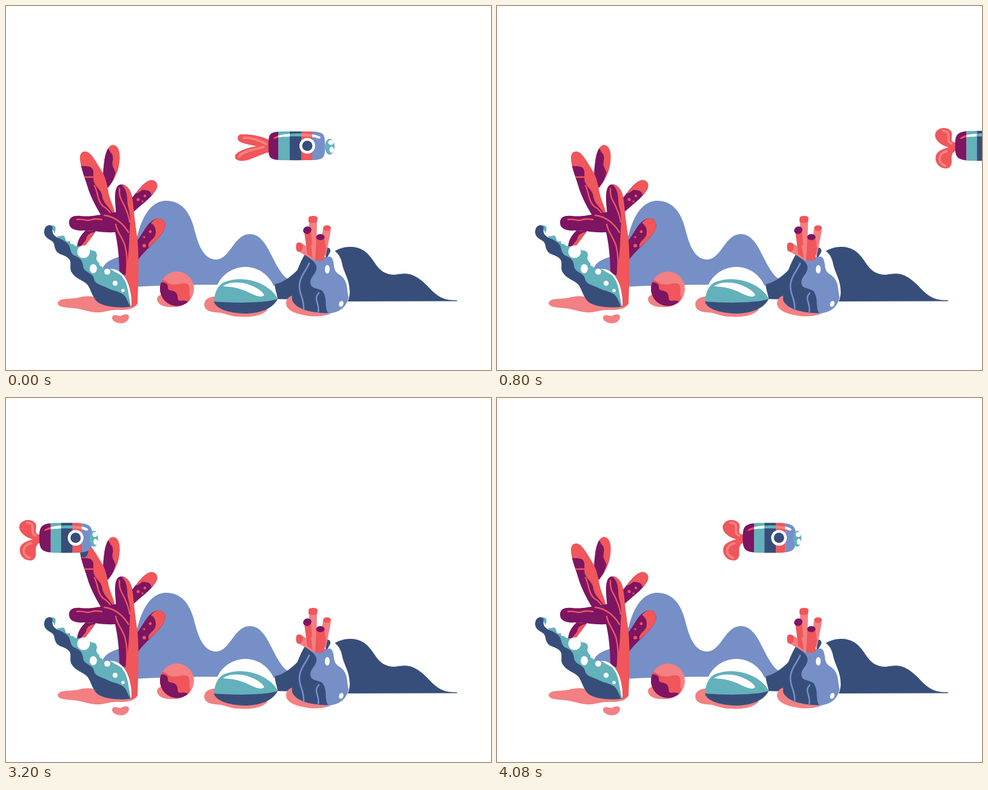
These frames come from a looping animation (800 px wide and 600 px high, 4160 ms). An HTML page:

```html
<!DOCTYPE html>
<html lang="en">
<head>
<meta charset="utf-8">
<title>Reef</title>
<style>
html, body { margin: 0; width: 100%; height: 100%; overflow: hidden; background: #fff; }
svg { display: block; width: 100%; height: 100%; }
.p { fill: #7d1562; } .r { fill: #f0565a; } .k { fill: #f38082; } .n { fill: #374e7b; }
.b { fill: #768fc7; } .t { fill: #62b1bb; } .w { fill: #fff; }
.l { fill: none; stroke: #f0565a; stroke-width: 2.4; stroke-linecap: round; }
.v { fill: none; stroke: #768fc7; stroke-width: 2.6; stroke-linecap: round; }
.f { fill: none; stroke: #f38082; stroke-width: 4; stroke-linecap: round; }
</style>
</head>
<body>
<svg viewBox="0 0 800 600">
<defs>
  <path id="armA" d="M122 250C122 242 127 239 133 240C142 243 149 258 158 272C166 285 167 300 171 315C175 328 180 336 181 350L160 350C150 334 139 314 134 296C130 282 122 264 122 250Z"/>
  <path id="armB" d="M160 280C161 258 164 229 177 229C187 230 189 245 187 258C185 276 177 288 168 300Z"/>
  <clipPath id="arms"><use href="#armA"/><use href="#armB"/></clipPath>
  <clipPath id="armAIn"><use href="#armA"/></clipPath>
  <clipPath id="armBIn"><use href="#armB"/></clipPath>
  <clipPath id="ball"><ellipse cx="282" cy="466" rx="28" ry="28.5"/></clipPath>
  <clipPath id="bodyIn"><path id="bodyClip"/></clipPath>
  <clipPath id="glossIn"><path id="glossClip"/></clipPath>
</defs>

<!-- hills -->
<path class="b" d="M158 437C160 424 174 416 190 413L217 378C224 350 238 321 264 321C291 321 303 342 309 362C315 384 322 418 347 418C370 417 376 376 402 376C432 376 438 426 462 448L466 450L446 461C410 460 330 459 300 460C270 461 240 461 215 463L190 450Z"/>
<path class="n" d="M443 459C458 455 468 448 482 434L490 484L447 483Z"/>
<path class="n" d="M538 407C550 398 560 397 570 397C592 398 601 413 608 423C616 436 626 443 641 443C660 440 668 440 682 450C704 466 708 486 744 485V486.500L560 487Z"/>

<!-- ground shadows -->
<path class="k" d="M85 490C88 480 104 484 118 481C130 478 140 477 148 481L180 494L213 496C202 502 190 501 180 501C165 502 160 506 147 505C132 503 124 499 110 498C97 497 86 496 85 490Z"/>
<path class="k" d="M175 514C176 506 184 511 189 511C194 508 203 506 203 513C201 521 195 523 188 523C181 522 175 519 175 514Z"/>
<path class="k" d="M249 482C251 476 256 476 260 475L295 491C288 496 280 497 268 496C256 495 249 490 249 482Z"/>
<path class="k" d="M327 492C327 483 338 478 348 479L432 500C426 509 405 514 385 512C368 512 360 505 346 505C334 504 327 500 327 492Z"/>
<path class="k" d="M462 490C462 482 468 478 476 476L540 504C530 512 508 513 494 510C476 507 462 501 462 490Z"/>

<!-- coral -->
<use href="#armB" class="r"/>
<path class="p" clip-path="url(#armBIn)" d="M155 235L169 235C173 245 178 242 176 256C173 268 184 270 179 280L172 302H155Z"/>
<use href="#armA" class="r"/>
<g clip-path="url(#armAIn)">
  <path class="p" d="M118 262C128 266 139 261 143 269C146 276 142 284 146 292C151 302 158 304 159 315C162 329 173 331 181 352H140Z"/>
  <path class="l" d="M130 282H146M146 296C152 308 151 322 160 330C168 334 173 340 177 350"/>
</g>
<path class="p" d="M117 398C118 385 124 377 131 370L148 371C141 382 134 390 129 397Z"/>
<path class="r" d="M146 372C141 383 134 390 129 397L123 398C126 390 132 389 133 381C136 375 140 375 146 372Z"/>
<path class="p" d="M104 357C104 347 113 345 123 346C142 348 150 344 164 343L190 338L212 400V450L187 440C187 415 184 390 180 373C160 374 144 370 129 370C113 371 104 367 104 357Z"/>
<path class="l" d="M117 352C130 350 132 356 142 352C148 350 152 351 158 352"/>
<path class="p" d="M207 317C220 302 228 288 241 287C250 288 252 298 246 305C238 318 222 328 209 341Z"/>
<path class="r" d="M214 309C222 300 230 287 241 287C250 288 252 298 246 305L240 312C239 303 231 304 227 303C222 303 220 309 214 309Z"/>
<path class="p" d="M215 388C228 374 234 351 252 350C263 351 265 361 260 371C250 388 231 400 218 418Z"/>
<path class="r" d="M239 358C244 352 248 350 253 350C263 351 265 361 260 371C253 382 245 390 235 398C233 388 243 386 246 378C249 370 245 360 239 358Z"/>
<g class="r">
  <circle cx="218" cy="319" r="2.600"/><circle cx="229" cy="313" r="2.200"/><circle cx="225" cy="322" r="1.500"/>
  <circle cx="238" cy="372" r="2.400"/><circle cx="228" cy="395" r="3"/><circle cx="228" cy="381" r="1.800"/>
</g>
<path class="p" d="M180 322C179 304 182 293 192 294C201 296 207 305 209 320L214 390L205 460L186 400Z"/>
<path class="r" d="M190 294C202 295 207 307 209 320C211 342 214 364 217 386C220 420 218 460 217 490C215 495 210 497 205 496L196 450L200 425C204 395 203 375 205 355C205 338 200 331 200 320C200 307 196 299 190 294Z"/>
<path class="l" d="M187 301C186 318 193 322 197 333C201 342 203 348 204 356M162 345C180 347 192 357 202 373M181 360C183 374 194 383 197 398C200 410 200 425 199 438"/>

<!-- spiral shell -->
<path class="w" d="M170 434C190 430 208 455 207 494L190 490Z"/>
<path class="t" d="M72 362C79 360 84 364 81 371C80 377 84 381 91 379C97 376 97 382 99 387C103 390 106 385 110 391C113 397 118 396 122 396C130 396 137 400 141 403C148 402 152 409 149 415C149 422 156 424 159 431C165 434 170 433 175 435C181 440 189 441 193 448C202 460 201 475 206 494L180 490L120 430Z"/>
<path class="n" d="M63 371C64 362 71 359 76 363C78 366 75 370 78 376C83 383 92 383 100 390C108 396 104 406 112 411C121 414 126 419 127 428C128 440 142 438 145 449C147 460 160 460 172 467C183 471 193 472 198 481L205 496C185 498 163 496 151 488C142 480 140 466 134 459C127 452 114 449 109 440C103 432 110 422 103 416C96 409 86 411 82 402C79 396 81 391 75 387C68 383 62 379 63 371Z"/>
<g class="w">
  <circle cx="128" cy="405" r="10.500"/><ellipse cx="144" cy="433" rx="6" ry="7.500"/><circle cx="167" cy="438" r="5"/>
  <circle cx="180" cy="457" r="4.200"/><circle cx="193" cy="469" r="2.800"/><circle cx="84" cy="374" r="2.800"/>
  <circle cx="109" cy="389" r="3.500"/><circle cx="158" cy="425" r="4"/>
</g>

<!-- ball -->
<g clip-path="url(#ball)">
  <path class="k" d="M250 430H315V500H250Z"/>
  <path class="r" d="M250 450C263 449 264 458 275 459C286 460 290 455 299 458C306 463 300 472 304 480L300 500H250Z"/>
  <path class="p" d="M250 457C260 453 268 457 267 464C267 471 276 467 281 473C285 480 281 486 288 486C294 485 298 486 302 488L290 500H250Z"/>
</g>

<!-- domed shell -->
<path class="w" d="M344 487C342 452 367 430 396 430C426 431 445 456 448 484Z"/>
<path class="t" d="M343 487C344 473 349 460 360 455C385 445 413 452 428 462C439 469 446 476 448 484L400 491Z"/>
<path class="w" d="M358 462C366 455 383 454 397 458C412 463 424 470 426 477C420 482 409 476 400 472C386 465 374 463 358 462Z"/>
<path class="n" d="M343 487C375 490 425 490 448 483C441 498 420 507 394 507C366 506 346 499 343 487Z"/>

<!-- vase and tubes -->
<path class="w" d="M532 400C544 402 551 410 554 423C557 440 567 450 567 472C566 491 556 504 535 507Z"/>
<path class="n" d="M526 400C530 396 536 399 535 405L528 418Z"/>
<path class="b" d="M494 408L530 414C537 410 540 418 541 428C542 442 551 441 557 449C564 459 562 468 565 480C562 497 549 506 530 507C510 506 480 500 474 489Z"/>
<path class="n" d="M493 409C498 415 510 420 512 429C514 440 502 446 502 455C502 469 519 463 524 473C530 484 525 496 531 506C508 506 480 502 472 485C470 458 482 428 493 409Z"/>
<path class="v" d="M500 424C495 437 485 445 484 460C483 476 492 480 491 501M516 473C506 484 518 489 515 504"/>
<ellipse class="w" cx="530" cy="434" rx="4" ry="7"/>
<ellipse class="w" cx="553" cy="491" rx="3.500" ry="5" transform="rotate(20 553 491)"/>
<path class="k" d="M487 391L510 404V420L483 405ZM523 367L536 369L528 410L515 415Z"/>
<path class="r" d="M479 392C483 387 491 391 490 397C489 404 484 407 480 404C478 401 478 396 479 392Z"/>
<ellipse class="r" cx="529.500" cy="366" rx="6.500" ry="4.500"/>
<path class="k" d="M500 350H513L512 415H500Z"/>
<path class="r" d="M499 349C500 345 513 345 514 349L513 356C509 358 503 358 499 356Z"/>
<path class="r" d="M492 372L503 370L507 416L497 409Z"/>
<ellipse class="p" cx="497" cy="369.500" rx="7" ry="6" transform="rotate(-20 497 369.500)"/>
<path class="k" d="M503 395L512 388V418L506 416Z"/>
<path class="r" d="M512 382H525L528 400L524 419C518 421 514 420 510 418Z"/>
<ellipse class="p" cx="518.500" cy="381" rx="7" ry="5"/>

<!-- fish and its shade on the coral -->
<g clip-path="url(#arms)"><path id="shade" class="n"/></g>
<g id="fish">
  <path id="up" class="r"/><path id="low" class="r"/>
  <path id="veinUp" class="f"/><path id="veinLow" class="f"/>
  <g id="stripes" clip-path="url(#bodyIn)">
    <rect class="p"/><rect class="t"/><rect class="n"/><rect class="r"/><rect class="b"/>
  </g>
  <g id="gloss" clip-path="url(#glossIn)">
    <rect class="r"/><rect class="w"/><rect class="t"/><rect class="k"/><rect class="w"/>
  </g>
  <circle class="w" r="13"/><circle class="n" r="8.500"/>
  <path id="mouth" class="t"/><path id="lips" class="w"/>
</g>
</svg>
<script>
const STEP = 80, LOOP = 4160, BEAT = 5.5;
const el = id => document.getElementById(id);

// shape: left, right, half height, corner y, corner x, mouth tip, then four stripe edges
const drift = {
  shape: [-64, 29, 24, 24, 0, 45, -48, -29, -10, 8],
  up: [-60, -8, -77, -18, -97, -19, -109, -19, -117, -18, -117, -7, -107, -5, -95, -1, -80, 1, -60, 4],
  low: [-60, -4, -85, 0, -115, 6, -119, 16, -121, 26, -107, 26, -97, 23, -85, 19, -72, 12, -60, 10],
  veinUp: [-105, -13, -95, -14, -80, -10, -68, -3],
  veinLow: [-113, 18, -108, 10, -90, 6, -72, 2]
};
const dart = {
  shape: [-60, 29, 25, 22, 5, 45, -40, -23, -7, 11],
  up: [-57, -6, -75, -9, -95, -15, -108, -15, -116, -14, -116, -6, -107, -4, -95, -1, -80, 0, -57, 3],
  low: [-57, -1, -85, 1, -112, 2, -119, 11, -122, 20, -110, 21, -100, 19, -85, 16, -72, 9, -57, 7],
  veinUp: [-106, -10, -92, -10, -78, -6, -62, -3],
  veinLow: [-113, 13, -105, 7, -88, 4, -68, 3]
};
const curl = {
  shape: [-60, 28, 25, 23, 5, 37, -41, -24, -5, 10],
  up: [-57, -5, -67, -6, -66, -9, -65, -18, -64, -27, -75, -31, -83, -29, -95, -26, -96, -10, -84, -5, -78, -1, -69, 1, -57, 5].slice(0, 14).concat([-103, -22, -92, 2, -57, 5]),
  low: [-57, -1, -77, 4, -91, 7, -92, 19, -93, 31, -82, 39, -72, 37, -58, 31, -74, 14, -57, 7],
  veinUp: [-80, -25, -62, -24, -78, -8, -66, -4],
  veinLow: [-76, 33, -90, 28, -88, 12, -74, 9]
};
const spread = {
  shape: [-60, 28, 25, 22, 5, 40, -41, -24, -6, 10],
  up: [-57, -5, -66, -12, -70, -22, -76, -32, -82, -42, -97, -40, -97, -29, -96, -14, -80, -1, -57, 5],
  low: [-57, -1, -80, 6, -97, 18, -97, 33, -97, 44, -83, 46, -76, 37, -70, 27, -66, 14, -57, 7],
  veinUp: [-88, -33, -82, -18, -78, -10, -66, -3],
  veinLow: [-88, 36, -86, 22, -78, 10, -66, 4]
};
const reach = { ...drift, shape: [-64, 25, 24, 24, 2, 48, -46, -28, -10, 8] };

const keys = [[0, spread], [0.5, spread], [1, curl], [1.5, curl], [2.5, drift], [3, reach], [4, dart], [BEAT, spread]];

function poseAt(phase) {
  const i = keys.findIndex(k => k[0] > phase);
  const [t0, a] = keys[i - 1], [t1, b] = keys[i];
  const u = (phase - t0) / (t1 - t0), pose = {};
  for (const part in a) pose[part] = a[part].map((v, n) => v + (b[part][n] - v) * u);
  return pose;
}

const curve = p => `M${p.slice(0, 2)}C${p.slice(2)}`;
const oval = (x, y, rx, ry) => `M${x - rx},${y}a${rx},${ry} 0 1 0 ${2 * rx},0a${rx},${ry} 0 1 0 ${-2 * rx},0Z`;

function setBands(id, edges) {
  [...el(id).children].forEach((r, i) => {
    r.setAttribute('x', edges[i]);
    r.setAttribute('y', -30);
    r.setAttribute('width', edges[i + 1] - edges[i]);
    r.setAttribute('height', 60);
  });
}

function drawFish(x, pose) {
  const [L, R, h, a, b, tip, ...edges] = pose.shape;
  const mid = (L + R) / 2, set = (id, d) => el(id).setAttribute('d', d);
  const body = `M${L},0C${L},${a} ${L + b},${h} ${mid},${h}C${R - b},${h} ${R},${a} ${R},0` +
    `C${R},${-a} ${R - b},${-h} ${mid},${-h}C${L + b},${-h} ${L},${-a} ${L},0Z`;
  const rx = Math.max((tip - R) / 2, 7), s = rx / 8;
  const mouth = oval(tip - rx, 1.5, rx, 13 - Math.max(0, s - 1) * 4);
  const up = curve(pose.up) + 'Z', low = curve(pose.low) + 'Z';
  set('up', up);
  set('low', low);
  set('veinUp', curve(pose.veinUp));
  set('veinLow', curve(pose.veinLow));
  set('bodyClip', body);
  set('glossClip', `M${L + 8},-12C${L + 14},-23 ${R - 14},-23 ${R - 7},-14C${R - 9},-10 ${R - 13},-13 ${R - 16},-14` +
    `C${R - 30},-16 ${L + 30},-16 ${L + 17},-14C${L + 13},-13 ${L + 9},-10 ${L + 8},-12Z`);
  set('mouth', mouth);
  set('lips', oval(tip - 6 * s, -5.5, 4.6 * s, 4) + oval(tip - 4.8 * s, 6.5, 3.8 * s, 5));
  set('shade', up + low + body + mouth);
  setBands('stripes', [L - 2, ...edges, R + 2]);
  setBands('gloss', [L - 2, ...edges, R + 2]);
  el('fish').setAttribute('transform', `translate(${x} 230.5)`);
  el('shade').setAttribute('transform', `translate(${x - 16} 248.5)`);
}

const start = performance.now();
function tick(now) {
  const n = Math.floor((Math.max(0, now - start) % LOOP) / STEP);
  const away = n > 13 && n < 36;
  el('fish').style.display = el('shade').style.display = away ? 'none' : '';
  if (!away) {
    const j = n < 26 ? n + LOOP / STEP : n;
    const x = 497 + 31.85 * (j - 52) - Math.max(0, 40 - j) * 2.9;
    drawFish(x, poseAt(j % BEAT));
  }
  requestAnimationFrame(tick);
}
tick(start);
</script>
</body>
</html>
```
